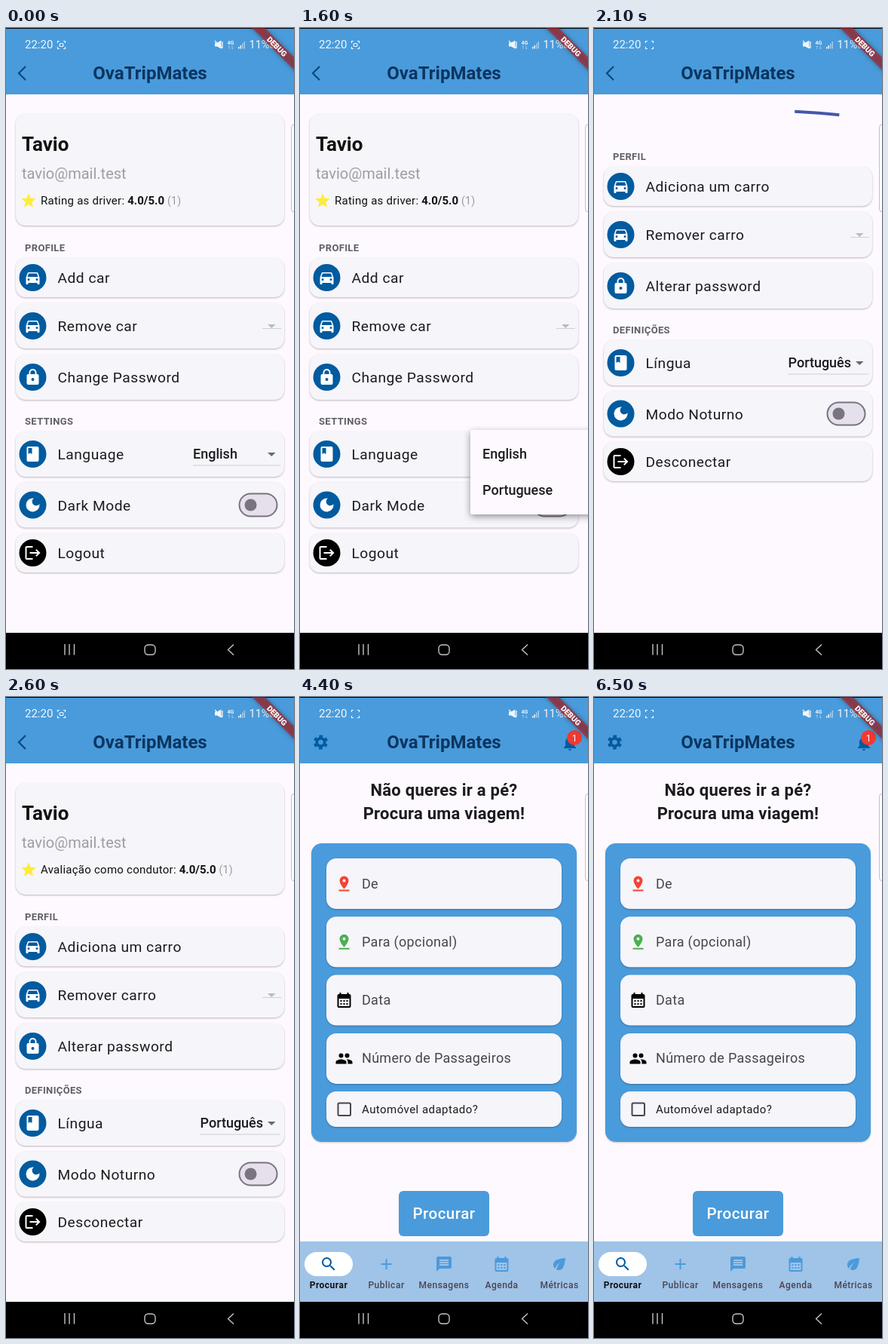
Write an HTML page that moves like this. It is 382 px wide and 850 px high and loops after 6600 ms.

```html
<!DOCTYPE html>
<html lang="pt">
<head>
<meta charset="utf-8">
<title>Ride app settings</title>
<style>
html, body { margin: 0; width: 100%; height: 100%; overflow: hidden; background: #000; }
svg { display: block; width: 100%; height: 100%; font-family: Roboto, sans-serif; }
.card { fill: #f5f5fa; filter: drop-shadow(0 1px .8px #0004); }
.m { font-weight: 500; }
.b { font-weight: 700; }
.mid { text-anchor: middle; }
.tile { font-size: 19.2px; letter-spacing: .5px; fill: #1c1b1f; }
.head { font-size: 13px; letter-spacing: .35px; font-weight: 700; fill: #625e69; }
.field { font-size: 18px; letter-spacing: .3px; fill: #49454f; }
.pick { font-size: 18px; font-weight: 500; fill: #1c1b1f; }
.line { fill: none; }
</style>
</head>
<body>
<svg viewBox="0 0 382 850" preserveAspectRatio="none">
  <defs><clipPath id="view"><rect width="382" height="802"/></clipPath></defs>
  <g clip-path="url(#view)">
    <g id="home"></g>
    <g id="en"></g>
    <g id="pt"></g>
    <path id="spin" class="line" stroke="#4458a9" stroke-width="4"/>
    <g id="menu">
      <rect id="sheet" x="226" width="170" rx="2" fill="#fef9fe" style="filter:drop-shadow(0 3px 5px #0006)"/>
      <g id="items" class="pick"><text x="242" y="571">English</text><text x="242" y="619">Portuguese</text></g>
    </g>
  </g>
  <g id="system"></g>
</svg>
<script>
const BLUE = '#4a9bdb', DEEP = '#005b9f', NAVY = '#0b3560';
const APP = 'OvaTripMates', USER = 'Tavio', MAIL = 'tavio@mail.test';

const icons = {
  car: 'M18.92 6C18.72 5.42 18.16 5 17.5 5h-11c-.66 0-1.21.42-1.42 1L3 12v8c0 .55.45 1 1 1h1c.55 0 1-.45 1-1v-1h12v1c0 .55.45 1 1 1h1c.55 0 1-.45 1-1v-8zM6.5 16a1.5 1.5 0 1 1 0-3 1.5 1.5 0 0 1 0 3zm11 0a1.5 1.5 0 1 1 0-3 1.5 1.5 0 0 1 0 3zM5 11l1.5-4.5h11L19 11z',
  lock: 'M18 8h-1V6A5 5 0 0 0 7 6v2H6a2 2 0 0 0-2 2v10a2 2 0 0 0 2 2h12a2 2 0 0 0 2-2V10a2 2 0 0 0-2-2zm-6 9a2 2 0 1 1 0-4 2 2 0 0 1 0 4zm3.1-9H8.9V6a3.1 3.1 0 0 1 6.2 0z',
  book: 'M18 2H6a2 2 0 0 0-2 2v16a2 2 0 0 0 2 2h12a2 2 0 0 0 2-2V4a2 2 0 0 0-2-2zM6 4h5v8l-2.5-1.5L6 12z',
  moon: 'M12 3a9 9 0 1 0 8.9 7.64A5.4 5.4 0 1 1 13.36 3.1 9 9 0 0 0 12 3z',
  exit: 'M17 7l-1.41 1.41L18.17 11H8v2h10.17l-2.58 2.58L17 17l5-5zM4 5h8V3H4a2 2 0 0 0-2 2v14a2 2 0 0 0 2 2h8v-2H4z',
  star: 'M12 17.27L18.18 21l-1.64-7.03L22 9.24l-7.19-.61L12 2 9.19 8.63 2 9.24l5.46 4.73L5.82 21z',
  bell: 'M12 22a2 2 0 0 0 2-2h-4a2 2 0 0 0 2 2zm6-6v-5c0-3.07-1.64-5.64-4.5-6.32V4a1.5 1.5 0 0 0-3 0v.68C7.63 5.36 6 7.92 6 11v5l-2 2v1h16v-1z',
  pin: 'M18 8A6 6 0 0 0 6 8c0 4.5 6 11 6 11s6-6.5 6-11zm-8 0a2 2 0 1 1 4 0 2 2 0 0 1-4 0zM5 20v2h14v-2z',
  date: 'M19 4h-1V2h-2v2H8V2H6v2H5a2 2 0 0 0-2 2v14a2 2 0 0 0 2 2h14a2 2 0 0 0 2-2V6a2 2 0 0 0-2-2zm0 16H5V10h14zM7 12h2v2H7zm4 0h2v2h-2zm4 0h2v2h-2zM7 16h2v2H7zm4 0h2v2h-2zm4 0h2v2h-2z',
  people: 'M16 11a3 3 0 1 0-3-3 3 3 0 0 0 3 3zm-8 0a3 3 0 1 0-3-3 3 3 0 0 0 3 3zm0 2c-2.33 0-7 1.17-7 3.5V19h14v-2.5c0-2.33-4.67-3.5-7-3.5zm8 0l-.97.05c1.16.84 1.97 1.97 1.97 3.45V19h6v-2.5c0-2.33-4.67-3.5-7-3.5z',
  search: 'M15.5 14h-.79l-.28-.27a6.5 6.5 0 1 0-.7.7l.27.28v.79l5 4.99L20.49 19zm-6 0a4.5 4.5 0 1 1 0-9 4.5 4.5 0 0 1 0 9z',
  plus: 'M19 13h-6v6h-2v-6H5v-2h6V5h2v6h6z',
  chat: 'M20 2H4a2 2 0 0 0-2 2v18l4-4h14a2 2 0 0 0 2-2V4a2 2 0 0 0-2-2zm-2 12H6v-2h12zm0-3H6V9h12zm0-3H6V6h12z',
  leaf: 'M6.05 8.05c-2.73 2.73-2.73 7.15-.02 9.88 1.47-3.4 4.09-6.24 7.36-7.93-2.77 2.34-4.71 5.61-5.39 9.32 2.6 1.23 5.8.78 7.95-1.37C19.43 14.47 20 4 20 4S9.53 4.57 6.05 8.05z'
};

const el = id => document.getElementById(id);
const clamp = v => Math.max(0, Math.min(1, v));
const text = (x, y, s, cls, more = '') => `<text x="${x}" y="${y}" class="${cls}" ${more}>${s}</text>`;
const rect = (x, y, w, h, r, more) => `<rect x="${x}" y="${y}" width="${w}" height="${h}" rx="${r}" ${more}/>`;
const card = (x, y, w, h) => rect(x, y, w, h, 13, 'class="card"');
const icon = (name, x, y, fill, size = 24) =>
  `<path fill="${fill}" fill-rule="evenodd" transform="translate(${x - size / 2} ${y - size / 2}) scale(${size / 24})" d="${icons[name]}"/>`;
const caret = (y, fill) => `<path fill="${fill}" d="M347 ${y}h10.5l-5.25 5z"/>`;

const frame = () => rect(0, 0, 382, 802, 0, 'fill="#fef9fe"') + rect(0, 0, 382, 88, 0, `fill="${BLUE}"`) +
  text(191, 68, APP, 'b mid', `font-size="24" fill="${NAVY}"`);

function settings(s) {
  // top, height, icon, icon centre
  const rows = [[305, 52, 'car', 331], [365, 60, 'car', 395], [433, 60, 'lock', 463],
    [535, 60, 'book', 565], [602.5, 60, 'moon', 632.5], [670, 52, 'exit', 696]];
  const tiles = rows.map(([y, h, name, cy], i) => card(13, y, 356, h) +
    `<circle cx="35.5" cy="${cy}" r="18" fill="${name == 'exit' ? '#000' : DEEP}"/>` +
    icon(name, 35.5, cy, '#fff') + text(68.5, cy + 7, s.rows[i], 'tile')).join('');
  return frame() +
    `<path class="line" stroke="#0b4a86" stroke-width="2.3" d="M26 51l-9 9 9 9"/>
    <g class="who">${card(13, 114, 356, 148)}
      ${text(21, 163, USER, 'b', 'font-size="26" fill="#111"')}
      ${text(21, 200, MAIL, '', 'font-size="20" fill="#a09ea3"')}
      ${icon('star', 30, 229, '#ffeb3b', 23)}
      <text x="46" y="234" font-size="15" letter-spacing=".25" fill="#111">${s.rating}: <tspan class="b" letter-spacing="0">4.0/5.0</tspan> <tspan font-size="14" fill="#9b999e">(1)</tspan></text>
    </g>
    <g class="rest">${text(25, 296, s.heads[0], 'head')}${text(25, 526, s.heads[1], 'head')}${tiles}
      ${caret(393, '#bbb')}${rect(340, 398, 25, 1, 0, 'fill="#d0cfd4"')}
      ${text(s.x, 571, s.lang, 'pick')}${caret(563, '#6b6870')}
      ${rect(s.x, 579.5, 364 - s.x, 1, 0, 'fill="#d0cfd4"')}
      ${rect(309.5, 617.5, 50, 30, 15, 'fill="#e6e0ec" stroke="#79747e" stroke-width="2"')}
      <circle cx="324.5" cy="632.5" r="8" fill="#79747e"/>
    </g>`;
}

function home() {
  const fields = [['De', 'pin', '#f44336'], ['Para (opcional)', 'pin', '#4caf50'],
    ['Data', 'date', '#000'], ['Número de Passageiros', 'people', '#000']];
  const tabs = [['Procurar', 'search'], ['Publicar', 'plus'], ['Mensagens', 'chat'], ['Agenda', 'date'], ['Métricas', 'leaf']];
  return frame() +
    `<g class="line" stroke="${DEEP}"><circle cx="27.5" cy="60" r="5.2" stroke-width="3.8"/>
      <circle cx="27.5" cy="60" r="8" stroke-width="3.2" stroke-dasharray="4.4 3.98" stroke-dashoffset="2.2" transform="rotate(30 27.5 60)"/></g>` +
    icon('bell', 358, 61, DEEP) + '<circle cx="364" cy="54" r="10" fill="#f13a30"/>' +
    text(364, 58.5, '1', 'mid', 'font-size="12" fill="#fff"') +
    ['Não queres ir a pé?', 'Procura uma viagem!'].map((s, i) =>
      text(191, 131 + 31 * i, s, 'b mid', 'font-size="22" letter-spacing=".25" fill="#1c1b1f"')).join('') +
    rect(15, 194, 352, 396, 14, `fill="${BLUE}" style="filter:drop-shadow(0 1px 1px #0003)"`) +
    fields.map(([s, name, fill], i) => {
      const y = 214 + 77.3 * i;
      return card(35, y, 312, 67) + icon(name, 58.5, y + 33.5, fill) + text(82, y + 39.5, s, 'field');
    }).join('') +
    card(35, 523, 312, 47) +
    rect(50.5, 538.5, 16.5, 16.5, 1.5, 'fill="none" stroke="#49454f" stroke-width="2"') +
    text(82, 552, 'Automóvel adaptado?', '', 'font-size="15" letter-spacing=".45" fill="#1c1b1f"') +
    rect(131, 655, 120, 60, 6, `fill="${BLUE}"`) +
    text(191, 692, 'Procurar', 'm mid', 'font-size="20.500" letter-spacing=".5" fill="#fff"') +
    rect(0, 722, 382, 80, 0, 'fill="#a0c3e8"') + rect(6, 736, 64, 32, 16, 'fill="#fff"') +
    tabs.map(([s, name], i) => {
      const x = 38 + 76.5 * i;
      return icon(name, x, 752, i ? BLUE : DEEP) +
        text(x, 784, s, i ? 'm mid' : 'b mid', `font-size="12" letter-spacing=".5" fill="${i ? '#49454f' : '#111'}"`);
    }).join('');
}

const system = () =>
  `${rect(0, 0, 382, 1, 0, '')}${rect(0, 802, 382, 48, 0, 'fill="#000"')}
  <g class="line" stroke="#c4c4c8" stroke-width="1.4">
    <path d="M78 817v14.5M84 817v14.5M90.5 817v14.5M302 817.5l-7.5 7 7.5 7"/>
    ${rect(184, 818, 14, 13, 4.5, '')}
  </g>
  <g fill="#f0f6fb">
    ${text(25, 27, '22:20', '', 'font-size="15"')}${text(322.5, 27, '11%', '', 'font-size="14.5"')}
    ${text(298, 22, '4G', 'b mid', 'font-size="7"')}
    <path d="M277 19.5h3l5.500-3v11l-5.500-3h-3zM308 25h1.5v2.5h-1.5zM310.5 23h1.5v4.5h-1.5z"/>
    <path opacity=".55" d="M313 20.5h1.5v7h-1.5zM315.5 18h1.5v9.5h-1.5z"/>
    <path class="line" stroke="#f0f6fb" stroke-width="1.3" d="M277 17l10 10M287 18v8"/>
    <path class="line" stroke="#f0f6fb" stroke-width=".8" opacity=".6" d="M296 28v-4.5l-1.5 1.5M300 23.5v4.5l1.5-1.5"/>
    <path class="line" stroke="#f0f6fb" stroke-width="1.2" d="M68.5 20v-2.5h2.5M76 17.5h2.5v2.5M78.5 25v2.5h-2.5M71 27.5h-2.5v-2.5"/>
    ${rect(71.3, 20.5, 4.5, 4, 1, 'id="dot" fill="none" stroke="#f0f6fb" stroke-width="1.2"')}
    ${rect(350, 18, 9, 9, 2, 'opacity=".7"')}
  </g>
  ${rect(378.5, 128, 10, 116, 4, 'fill="#fff" fill-opacity=".3" stroke="#999" stroke-opacity=".6"')}
  <g transform="translate(383.5 .5) rotate(45)">
    ${rect(-45, 28, 90, 12, 0, 'fill="#b71c1c" fill-opacity=".627" style="filter:drop-shadow(0 0 3px #0008)"')}
    ${text(0, 37.7, 'DEBUG', 'mid', 'font-size="10.2" font-weight="900" fill="#fff"')}
  </g>`;

el('home').innerHTML = home();
el('en').innerHTML = settings({
  rating: 'Rating as driver', heads: ['PROFILE', 'SETTINGS'], lang: 'English', x: 248,
  rows: ['Add car', 'Remove car', 'Change Password', 'Language', 'Dark Mode', 'Logout']
});
el('pt').innerHTML = settings({
  rating: 'Avaliação como condutor', heads: ['PERFIL', 'DEFINIÇÕES'], lang: 'Português', x: 257.5,
  rows: ['Adiciona um carro', 'Remover carro', 'Alterar password', 'Língua', 'Modo Noturno', 'Desconectar']
});
el('system').innerHTML = system();

const who = document.querySelector('#pt .who'), rest = document.querySelector('#pt .rest');
const show = (node, on) => node.setAttribute('visibility', on ? 'inherit' : 'hidden');
const zoom = (node, k) => node.setAttribute('transform', `translate(191 401) scale(${k}) translate(-191 -401)`);

function drawMenu(t) {
  const p = (t - 800) / 300, grow = clamp(p * 4 - 1);
  show(el('menu'), p > 0 && t < 1900);
  el('menu').setAttribute('opacity', clamp(p * 4));
  el('sheet').setAttribute('y', 541 - 8 * grow);
  el('sheet').setAttribute('height', 48 + 64 * grow);
  el('items').setAttribute('opacity', clamp(p * 4 - 2));
}

// Loading ring, stretched to the width of the list
function drawSpinner(t) {
  const at = deg => {
    const a = deg * Math.PI / 180;
    return `${191 + 178 * Math.cos(a)} ${127 + 18 * Math.sin(a)}`;
  };
  const start = -65 + (t - 2100) * .25, sweep = 24 + (t - 2100) * .2;
  el('spin').setAttribute('d', `M${at(start)}A178 18 0 0 1 ${at(start + sweep)}`);
}

function draw(now) {
  const t = Math.floor(now % 6600 / 100) * 100;
  const loading = t >= 2000 && t < 2300;
  const leave = clamp((t - 4000) / 300), ease = 1 - (1 - leave) ** 3;

  show(el('en'), t < 1900);
  show(el('pt'), t >= 2000 && leave < 1);
  show(el('home'), leave > 0);
  show(who, !loading);
  show(el('spin'), loading);
  rest.setAttribute('transform', `translate(0 ${loading ? -121 : 0})`);
  if (loading) drawSpinner(t);
  drawMenu(t);

  el('pt').setAttribute('opacity', clamp(1 - leave * 1.5));
  zoom(el('pt'), 1 - .12 * ease);
  zoom(el('home'), 1.08 - .08 * ease);
  show(el('dot'), t % 1000 < 100 || t % 1000 >= 600);
  requestAnimationFrame(() => draw(performance.now() - begin));
}
const begin = performance.now();
draw(0);
</script>
</body>
</html>
```
